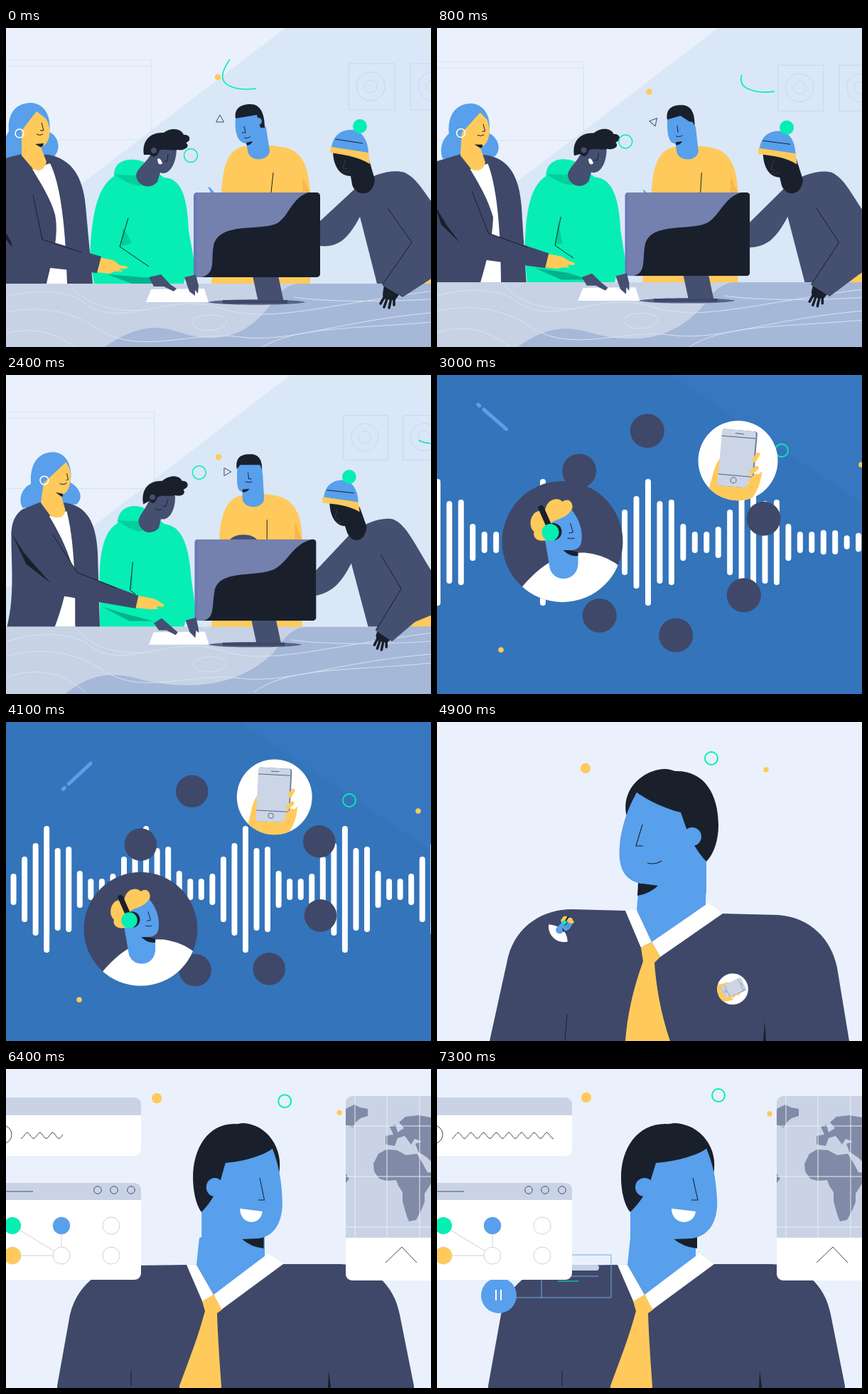
An HTML page with a canvas for the animation above (7.4 s loop, 598 px wide and 448 px high).

```html
<!DOCTYPE html>
<html lang="en">
<head>
<meta charset="utf-8">
<title>Team, sound and profile</title>
<style>
html, body { margin: 0; width: 100%; height: 100%; overflow: hidden; background: #eaf1fc; }
canvas { display: block; width: 598px; height: 448px; }
</style>
</head>
<body>
<canvas id="stage" width="598" height="448"></canvas>
<script>
const ctx = document.getElementById('stage').getContext('2d');
const LOOP = 7400, STEP = 100, TAU = Math.PI * 2;
const C = {
  navy: '#3f4868', slate: '#454f70', ink: '#19202c', blue: '#589fec', yellow: '#ffca5b',
  green: '#06eeb3', white: '#fff', pale: '#eaf1fc', sky: '#dae7f7', grey: '#c7d2e5', land: '#818aa6'
};

const clamp = (v, lo = 0, hi = 1) => Math.min(hi, Math.max(lo, v));
const mix = (a, b, p) => a + (b - a) * p;

// Eased value from time/value pairs.
function key(t, ...k) {
  if (t <= k[0]) return k[1];
  for (let i = 2; i < k.length; i += 2) {
    if (t < k[i]) {
      const u = (t - k[i - 2]) / (k[i] - k[i - 2]);
      return mix(k[i - 1], k[i + 1], u * u * (3 - 2 * u));
    }
  }
  return k[k.length - 1];
}

// Paths may have a second pose with the same commands; `pose` mixes them.
let pose = 0;
const NUMBER = /-?\d*\.?\d+/g;
function path(a, b) {
  if (!b) return new Path2D(a);
  const to = b.match(NUMBER);
  let i = 0;
  return new Path2D(a.replace(NUMBER, v => ' ' + mix(+v, +to[i++], pose).toFixed(2)));
}
function fill(color, a, b) {
  ctx.fillStyle = color;
  ctx.fill(path(a, b));
}
function line(color, width, a, b) {
  ctx.strokeStyle = color;
  ctx.lineWidth = width;
  ctx.stroke(path(a, b));
}
function roundLine(...args) {
  ctx.lineCap = 'round';
  line(...args);
  ctx.lineCap = 'butt';
}
function disc(color, x, y, r) {
  ctx.fillStyle = color;
  ctx.beginPath();
  ctx.arc(x, y, Math.max(0, r), 0, TAU);
  ctx.fill();
}
function ring(color, width, x, y, r) {
  ctx.strokeStyle = color;
  ctx.lineWidth = width;
  ctx.beginPath();
  ctx.arc(x, y, Math.max(0, r), 0, TAU);
  ctx.stroke();
}
const move = (a, b) => mix(a, b, pose);
function placed(x, y, scale, angle, draw) {
  ctx.save();
  ctx.translate(x, y);
  ctx.rotate(angle * Math.PI / 180);
  ctx.scale(scale, scale);
  draw();
  ctx.restore();
}
function zoom(s, draw) {
  placed(300, 222, s, 0, () => { ctx.translate(-300, -222); draw(); });
}
function background(color) {
  ctx.fillStyle = color;
  ctx.fillRect(0, 0, 598, 448);
}

/* Office */
function room() {
  fill(C.pale, 'M-30-30H432L0 300H-30Z');
  line('#d4e2f4', 1, 'M-30 45H205V157H-30M-30 54H205');
  for (const x of [482, 569]) {
    line('#c3d7f3', 1, `M${x} 50h65v65h-65z`);
    ring('#c3d7f3', 1, x + 31, 82, 20);
    ring('#c3d7f3', 1, x + 31, 82, 9);
  }
}

function sweaterMan() {
  fill(C.yellow,
    'M289 359L303 232C305 195 312 175 328 168C345 162 390 164 404 172C420 182 426 200 428 232V359Z',
    'M289 355L300 232C302 200 308 178 326 170C345 164 385 165 398 176C412 187 418 205 418 232L424 355Z');
  fill('#f5b84a', 'M418 210L417 232H428Z', 'M408 206L407 232H418Z');
  line(C.ink, 1, 'M376 203L373 231', 'M368 203L368 231');
  fill(C.blue,
    'M323 127C321 150 328 162 338 162L341 176C346 188 369 187 371 173L366 140L354 120Z',
    'M326 122C325 148 324 163 333 163L333 174C336 188 361 189 364 174L362 140L360 122Z');
  fill(C.ink,
    'M323 127C321 113 330 107 344 107C358 107 364 120 364 140L358 140L353 122Z',
    'M325 131C323 115 330 110 344 110C357 110 361 118 361 132L358 125L330 125Z');
  disc(C.blue, move(355, 359), move(131, 141), move(5, 3));
  fill(C.ink, 'M338 161L347 159Q345 164 339 165Z', 'M333 160L343 159Q340 164 333 164Z');
  line(C.ink, 1, 'M335 138L337 147L332 147M335 154Q341 156 344 152', 'M341 136L342 145L346 145M337 149Q343 151 347 149');
  fill(C.blue, 'M284 223L287 224L294 232H289Z', 'M296 232L297 232L298 233H296Z');
  fill(C.slate, 'M313 240C322 236 348 236 356 240Z', 'M313 234C320 221 349 221 356 234Z');
}

function beanieMan() {
  fill(C.slate,
    'M441 272L494 223C515 204 545 198 561 203C580 212 588 232 606 253V359H522L498 265C482 295 468 309 441 306Z',
    'M437 276L484 226C505 207 535 198 549 203C568 212 578 238 606 282V355H512L488 265C474 292 462 306 437 311Z');
  fill(C.yellow, 'M574 359L606 343V359Z', 'M562 355L606 337V355Z');
  fill(C.ink,
    'M460 172C460 194 470 208 485 208L487 220C492 237 517 238 519 213L510 182Z',
    'M457 176C457 198 466 212 479 212L482 221C488 237 508 237 510 213L500 185Z');
  line('#343b49', 1, 'M478 185L474 197L481 198M473 200Q480 205 485 200', 'M468 188L465 200L471 202M466 205Q472 209 477 206');
  fill(C.yellow, 'M457 165L510 174L512 191C494 180 475 178 456 175Z', 'M447 170L498 177L500 192C483 182 466 181 447 179Z');
  fill(C.blue, 'M458 167C461 148 475 142 488 143C501 145 509 157 510 175Z', 'M449 171C451 153 463 146 477 147C490 149 497 160 498 178Z');
  line(C.ink, 1, 'M463 156L502 162', 'M453 161L492 165');
  disc(C.green, move(498, 485), move(138, 142), 10);
}

function beanieArm() {
  fill(C.ink, 'M532 360L555 372L547 383L531 380L530 374Z', 'M526 358L547 370L539 378L525 375L523 368Z');
  roundLine(C.ink, 3.6,
    'M534 375L527 387M537 378L532 392M542 379L539 393M546 378L546 389',
    'M527 369L521 381M530 372L525 386M534 374L531 388M538 372L538 384');
  fill(C.slate, 'M571 300L606 285V347L558 378L529 361Z', 'M558 300L606 290V325L546 376L522 360Z');
  line(C.ink, 1, 'M537 253L571 301L530 360', 'M530 253L559 301L524 359');
}

function hoodieMan() {
  fill(C.green,
    'M124 359L118 325C120 270 126 225 152 208C151 184 176 181 194 188L222 210C245 211 255 232 257 285L268 345L252 350L250 359H225Z',
    'M130 355L130 322C128 270 130 222 155 208C156 184 178 180 192 186L222 209C246 211 257 238 260 285L268 342L252 346L250 355H222Z');
  fill('#03cf9b', 'M153 206C165 215 178 221 190 222L184 207Z', 'M156 204C166 213 178 219 190 220L185 205Z');
  fill('#03b28b', 'M143 346L204 351L222 359H177Z', 'M132 326L160 335L206 347H172Z');
  fill('#03cf9b', 'M165 280L160 307L177 302Z', 'M177 263L173 302L176 302Z');
  line(C.ink, 1, 'M172 267L160 307L201 335', 'M177 263L173 303L181 309');
  fill(C.slate,
    'M208 166C203 188 185 194 183 207C185 224 204 227 213 216L217 203C229 208 240 192 240 168Z',
    'M203 166C199 186 186 194 185 206C188 223 205 225 214 215L217 202C230 205 239 186 237 166Z');
  fill(C.ink,
    'M194 178C191 158 203 146 222 147C232 139 247 141 250 150C260 149 261 159 253 161C261 167 249 173 242 171C232 173 224 169 216 172C213 181 207 183 203 178Z',
    'M192 181C188 160 200 147 219 148C228 139 244 139 247 148C257 147 258 158 249 160C254 167 244 171 237 168C228 171 220 167 212 171C209 180 205 182 201 176Z');
  disc(C.slate, move(208, 205), move(172, 171), 4);
  line(C.ink, 1, 'M228 177L227 187L223 187', 'M227 174L224 184L220 184');
  if (pose < .5) fill(C.white, 'M213 184Q217 181 220 190Q214 195 213 184Z');
  else line(C.ink, 1, 'M209 187Q214 191 218 188');
}

function hoodieHands() {
  fill(C.slate,
    'M201 350L218 346L231 360L240 366L236 370L222 363L208 363Z',
    'M207 350L218 343L232 355L241 363L238 367L225 360L214 360Z');
  fill(C.slate,
    'M251 350L267 346L271 362L270 373L266 368L266 376L258 370Z',
    'M252 346L267 342L270 355L271 364L267 360L266 371L258 363Z');
}

function woman() {
  fill(C.blue,
    'M-2 182C-6 165-2 155 4 145C2 122 12 105 36 105C56 107 64 126 61 146C74 152 78 170 68 180Z',
    'M20 186C13 172 20 158 32 152C30 124 42 107 64 107C84 108 92 130 88 150C101 157 108 172 97 181Z');
  fill(C.navy,
    'M-30 190L22 177L60 178C92 184 108 208 112 250L122 359H-30C-30 310-30 270-30 225C-30 205-30 195-30 190Z',
    'M20 188L48 177L82 179C112 184 125 208 127 250L130 355H-2C9 310 4 270 4 225C4 206 10 195 20 188Z');
  fill(C.white,
    'M37 198L62 190C77 220 84 280 86 359H57C65 325 75 292 69 262C63 240 50 220 37 198Z',
    'M58 198L83 191C90 220 96 260 95 355H66C76 330 82 300 91 270C82 240 70 218 58 198Z');
  fill(C.yellow,
    'M43 117L56 127C67 145 60 165 49 167L57 188C54 199 47 203 38 198L22 179L22 144Z',
    'M82 121L87 130C91 147 87 166 75 168L81 189C80 200 70 202 60 198L46 179L50 151Z');
  fill(C.ink, 'M41 163L53 162Q52 168 48 167Z', 'M67 164L77 166Q79 171 75 170Z');
  line(C.ink, 1, 'M50 133L53 144L48 144M43 149Q48 152 52 149', 'M83 137L85 146L82 147M73 152Q79 154 83 151');
  ring(C.white, 1.6, move(19, 51), move(148, 147), 6);
  fill(C.yellow,
    'M131 322L151 326L160 333L171 335L170 338L160 338L164 342L152 342L146 345L128 343Z',
    'M184 311L207 315L214 319L222 324L220 327L211 326L213 330L203 330L198 330L180 328Z');
  fill(C.navy,
    'M-25 260L38 245L50 296L134 321L128 344L25 333L-25 315Z',
    'M4 222L62 225L98 278L185 311L181 329L76 311L35 307Z');
  fill(C.ink, 'M-10 270L7 300L9 308L-10 285Z', 'M5 223L22 250L60 293L25 266Z');
  line(C.ink, 1, 'M38 235L51 297L106 315', 'M63 224L98 278L153 300');
}

function desk() {
  fill('#c7d2e5', 'M-30 359H640V480H-30Z');
  fill('#a6b8d8', 'M110 470C170 420 205 414 243 427C315 451 350 418 375 385Q390 362 410 359H640V480Z',
    'M50 480C95 432 130 424 170 432C285 464 350 428 382 394Q402 362 424 359H640V480Z');
  for (const d of [
    'M-20 384C40 360 95 372 110 386C160 425 230 370 300 393S440 390 610 368',
    'M-20 404C50 383 100 402 132 424C190 460 260 425 330 434S470 410 610 399',
    'M90 359C105 385 150 402 200 395',
    'M350 455C400 418 480 424 610 412',
    'M-20 436C30 415 70 425 105 455',
    'M405 378C450 385 540 385 610 380',
    'M262 414C264 400 307 399 311 412C308 428 266 429 262 414Z'
  ]) line('#d9e3f2', 1, d);
}

function monitor() {
  fill('#56648d', 'M284 385C300 380 405 380 421 385C405 390 300 390 284 385Z');
  fill(C.slate, 'M347 348H383L391 385H355Z');
  fill(C.navy, 'M305 382H396V387H305Z');
  ctx.save();
  ctx.beginPath();
  ctx.roundRect(264, 231, 178, 119, 5);
  ctx.clip();
  fill('#7480ae', 'M264 231H442V350H264Z');
  fill('#6678b8', 'M264 231H268V350H264Z');
  fill(C.ink,
    'M425 231C402 239 398 264 382 274C358 286 300 271 292 306C288 326 296 345 275 350H442V231Z',
    'M436 231C408 238 402 262 382 274C356 288 298 273 293 308C289 328 294 348 275 350H442V231Z');
  ctx.restore();
}

// The stroke leaves to the right while its start is wiped away.
function arc() {
  ctx.save();
  ctx.translate(move(0, 270), move(0, 9));
  ctx.setLineDash([0, 44 * pose, 200]);
  line(C.green, 1.6, 'M315 44C301 64 301 76 316 82Q330 88 352 85');
  ctx.restore();
}

function office(t) {
  const drift = .0275 / 1700, cam = 1 - drift * t;
  const follow = cam / (1 - drift * Math.min(t, 1700));
  pose = key(t, 0, 0, 1700, 1);
  background(C.sky);
  zoom(cam, room);
  zoom(follow, () => {
    sweaterMan();
    beanieMan();
    hoodieMan();
    woman();
    disc(C.yellow, move(298, 299), move(69, 114), 4.3);
    ring(C.green, 1.5, move(260, 271.5), move(179, 136), 9.5);
    placed(move(301, 311), move(128, 135), 1, 90 * pose, () => line(C.navy, 1, 'M0-6L5.5 4L-5.5 4Z'));
    arc();
  });
  zoom(cam, () => {
    desk();
    monitor();
    fill(C.white, 'M204 367L279 366L285 385H197Z');
  });
  zoom(follow, () => { hoodieHands(); beanieArm(); });
}

/* Sound */
const PROFILE = [89, 58, 60, 26, 15, 15, 22, 46, 65];

function listener() {
  ctx.save();
  disc(C.navy, 0, 0, 85);
  ctx.clip();
  fill(C.white, 'M-62 70C-28 26 10 10 42 17Q66 22 82 36L50 90H-50Z');
  fill(C.blue, 'M-24-40L12-46C22-34 29-18 27-2C26 8 20 13 8 12L22 16V32C20 58-14 58-18 36L-25-5Z');
  fill(C.ink, 'M1 12H12L22 15V20Q11 22 1 12Z');
  fill(C.yellow, 'M-22-2C-36 1-42-6-40-14C-47-20-46-32-41-38C-36-46-24-42-24-46C-20-62-4-62 0-56C8-62 15-56 14-47C8-34-6-32-14-28L-18-16Z');
  roundLine(C.ink, 8, 'M-30-47L-19-22');
  disc(C.ink, -13, -14, 12);
  disc(C.green, -17, -13, 12);
  line(C.ink, 1, 'M11-26L15-13L9-12M7-5Q13-3 17-5');
  ctx.restore();
}

function phone(tilt) {
  ctx.save();
  disc(C.white, 0, 0, 56);
  ctx.clip();
  placed(0, 0, 1, tilt, () => {
    fill(C.yellow, 'M-25-2C-34 10-33 30-42 62H14C26 52 34 38 35 12L16 30H-26Z');
    fill('#6f7c9c', 'M-24-43H20Q24-43 24-39V32Q24 37 20 37H-24Z');
    fill('#cbd5e6', 'M-22-43H18Q22-43 22-39V32Q22 37 18 37H-22Q-26 37-26 33V-39Q-26-43-22-43Z');
    line('#56627f', 1, 'M-26-33H22M-26 21H22M-7-38H5');
    ring('#56627f', 1, -4, 28, 4);
    roundLine(C.yellow, 6, 'M23-3L27-11M20 15L27 8M20 27L27 19M17 36L25 30');
  });
  ctx.restore();
}

function orbit(degrees, radius) {
  const a = degrees * Math.PI / 180;
  return [316 + radius * Math.cos(a), 222 + radius * Math.sin(a)];
}
const listenerSpot = k => [...orbit(175.1 - 23.6 * k, 140 + 4 * k), 1 - .06 * k];
const phoneSpot = k => [...orbit(-43.4 - 18.7 * k, 148 - 16 * k), 1 - .055 * k];

function sound(t) {
  const k = (t - 3000) / 1100, pop = key(t, 2400, 0, 2800, 1);
  background('#3474bb');
  fill('#3777c0', 'M330 0H598V180Z');

  const front = 575 + (t - 3000) * 1.15;
  for (let i = -36; i <= 36; i++) {
    const x = 297 + 40 * k + i * 16.45 * (1 - .055 * k);
    const half = PROFILE[(i + 36) % 9] * clamp((front - x) / 40, .15, 1) - 4;
    roundLine(C.white, 8, `M${x} ${235 - half}V${235 + half}`);
  }
  placed(78 + 22 * k, 59 + 17 * k, 1, 41 - 84 * k, () => roundLine('#589fec', 5, 'M-27 0H-24M-16 0H26'));

  for (const angle of [-8, 37, 82, 127, 217, 262]) {
    disc(C.navy, ...orbit(angle - 15.5 * k, 145 - 9 * k), (24 - 1.2 * k) * pop);
  }
  ring(C.green, 1.8, 485 - 2 * k, 106 + 4 * k, 9);
  const [lx, ly, ls] = listenerSpot(k), [px, py, ps] = phoneSpot(k);
  placed(lx, ly, ls * pop, 0, listener);
  placed(px, py, ps * pop, 0, () => phone(5 - 2 * k));
  disc(C.yellow, 597 - 17 * k, 126 - k, 3.8);
  disc(C.yellow, 90 + 13 * k, 386 + 4 * k, 3.8);
}

/* Profile */
function torso() {
  fill(C.navy,
    'M74 448L100 330C112 285 150 263 190 263L265 265L400 269L480 271C525 274 555 305 563 345L580 448V520H74Z',
    'M72 448L90 348C102 300 140 279 180 279L254 278L388 277L470 277C515 278 546 305 554 348L574 448V520H72Z');
  fill(C.blue, 'M284 228L281 264L302 309L378 257L379 200Z', 'M272 240L268 278L292 320L364 268L364 215Z');
  fill(C.white, 'M265 265L281 264L302 309L287 317Z', 'M254 278L268 278L292 320L277 331Z');
  fill(C.white, 'M302 309L382 254L402 269L314 330Z', 'M292 320L369 262L390 277L303 341Z');
  fill(C.yellow,
    'M287 317L302 309L314 330L306 338C308 370 315 410 328 448V520H265V448C268 410 276 375 290 336Z',
    'M276 329L292 320L304 341L297 346C298 380 301 420 303 448V520H244V448C258 410 270 380 280 343Z');
  line(C.ink, 1, 'M183 410L180 448', 'M176 427L176 448');
  fill(C.ink, 'M461 420L459 448V520H463V448Z', 'M454 427L453 448V520H457V448Z');
}

function head(t) {
  fill(C.ink, 'M283 226L312 229Q300 241 282 244Z', 'M270 238L304 241Q290 253 270 255Z');
  fill(C.ink,
    'M267 132C258 95 290 66 322 66C328 66 333 69 336 69C375 68 396 100 396 145C396 165 390 185 379 196L335 170L281 99Z',
    'M247 151C239 115 265 80 302 79C306 79 310 81 314 80C355 80 377 115 377 155C377 175 372 195 364 204L320 175L257 115Z');
  fill(C.blue,
    'M281 99C300 112 322 122 343 127L351 150C358 168 366 182 379 196L379 240L312 230L290 227C265 225 254 205 257 175C258 155 266 125 281 99Z',
    'M257 115C275 127 305 133 328 135L335 158C342 178 350 190 364 204L364 254L303 242L278 241C252 238 240 215 242 185C243 155 250 130 257 115Z');
  disc(C.blue, move(359, 344), move(161, 169), 13);
  line(C.ink, 1.1, 'M289 144L280 174L290 174', 'M276 156L269 187L278 187');
  if (t < 5200) line(C.ink, 1.1, 'M296 198Q307 201 316 195', 'M280 211Q291 214 300 208');
  else fill(C.white, 'M272 203L306 199C306 212 296 218 289 218C280 218 273 212 272 203Z');
}

function card(x, y, scale, angle, left, w, h, top, content) {
  placed(x, y, scale, angle, () => {
    ctx.beginPath();
    ctx.roundRect(left, 0, w, h, 9);
    ctx.clip();
    fill(C.white, `M${left} 0h${w}v${h}h${-w}z`);
    fill('#c9d3e5', `M${left} 0h${w}v${top}h${-w}z`);
    content();
  });
}

function audioCard(t) {
  const end = key(t, 6000, -169, 6900, -26);
  ring(C.navy, 1, -195, 52, 13);
  ctx.beginPath();
  for (let x = -169; x <= end; x++) ctx.lineTo(x, 53.5 + 4 * Math.cos((x + 169) * TAU / 17.8));
  ctx.strokeStyle = C.navy;
  ctx.lineWidth = 1;
  ctx.stroke();
}

function networkCard(t, settle) {
  const node = (x0, y0, r0, x1, y1) => [mix(x0, x1, settle), mix(y0, y1, settle), mix(r0, 12, settle)];
  const greenNode = node(-159, 86, 8, -181, 60), blueNode = node(-115, 78, 10, -112, 60);
  const yellowNode = node(-89, 97, 4.5, -181, 102), hub = node(-115, 113, 9, -112, 102);
  const joins = settle > .5 ? [greenNode, blueNode, yellowNode] : [greenNode, yellowNode];
  for (const [x, y] of joins) line('#cdd1dc', 1, `M${x} ${y}L${hub[0]} ${hub[1]}`);
  for (const n of [blueNode, hub]) { disc(C.white, ...n); ring('#cdd1dc', 1, ...n); }
  ring('#cdd1dc', 1, ...node(-159, 113, 8, -181, 102));
  disc(C.green, ...greenNode);
  disc(C.yellow, ...yellowNode);
  disc(C.blue, blueNode[0], blueNode[1], key(t, 5900, 0, 6300, 12));
  ctx.globalAlpha = settle;
  for (const y of [60, 102]) ring('#cdd1dc', 1, -42, y, 12);
  line(C.slate, 1, 'M-195 12H-152');
  for (const x of [-61, -38, -14]) ring(C.slate, 1, x, 10, 5.3);
  ctx.globalAlpha = 1;
}

function mapCard(settle) {
  ctx.globalAlpha = settle;
  placed(-478, -38, 1, 0, () => {
    fill(C.land, 'M478 56L490 50L498 54L509 56V66L499 69L493 74L488 82L478 79ZM478 147L483 154L478 160Z');
    fill(C.land, 'M535 113L524 119L517 133L518 144L525 154L535 157L549 156L552 164L558 173L558 186L564 207L567 214L577 212L584 199L589 187V175L600 158L606 146L593 145L586 132L578 119L563 121L550 114Z');
    fill(C.land, 'M534 106V94L545 92L540 81L548 78L551 89L560 83L553 75L562 67L580 65L598 68L660 60V142L608 139L592 124L580 116L576 105L585 102L575 98L570 106L561 94L551 97L547 108Z');
    line('#e9eef7', 1, 'M491 38V237M536 38V237M582 38V237M478 80H660M478 151H660M478 222H660');
    line(C.navy, 1, 'M534 272L557 250L578 272');
  });
  ctx.globalAlpha = 1;
}

function player(t) {
  const grow = key(t, 6400, 0, 6900, 1);
  if (!grow) return;
  ctx.globalAlpha = grow;
  line('#78a9e2', 1, 'M110 321H245V261H147V321');
  roundLine(C.grey, 8, 'M180 279H224');
  line('#78a9e2', 1, 'M180 291H227');
  line(C.green, 1, 'M170 298H199');
  ctx.globalAlpha = 1;
  placed(87, 318, grow, 0, () => {
    disc(C.blue, 0, 0, 25);
    line(C.white, 2, 'M-4-8V7M3-8V7');
  });
}

function profile(t) {
  const settle = key(t, 5600, 0, 6300, 1), away = key(t, 5200, 1, 5600, 0);
  pose = key(t, 4900, 0, 5300, 1);
  background(C.pale);

  placed(0, key(t, 4500, 70, 4900, 0) + key(t, 5600, 0, 6300, -3), 1, 0, () => {
    torso();
    const turn = key(t, 6200, 1, 6600, -1);
    ctx.save();
    ctx.translate(318, 0);
    ctx.scale(Math.max(.93, Math.abs(turn)) * (turn > 0 ? 1 : -1), 1);
    ctx.translate(-318, 0);
    head(t);
    ctx.restore();
  });

  const fly = key(t, 4500, 0, 4900, 1), size = key(t, 4900, 1, 5200, 0);
  const [lx, ly, ls] = listenerSpot(1.36), [px, py, ps] = phoneSpot(1.36);
  if (size) {
    placed(mix(lx, 179, fly), mix(ly, 287, fly), mix(ls, .26, fly) * size, 55 * fly, listener);
    placed(mix(px, 416, fly), mix(py, 375, fly), mix(ps, .39, fly) * size, 62 * fly, () => phone(2));
  }

  const then = (a, b, c) => key(t, 4900, a, 5600, b, 7300, c);
  disc(C.yellow, then(209, 214, 210), then(65, 42, 40), 7.2);
  ring(C.green, 2, then(386, 389, 396), then(51, 52, 37), 9);
  disc(C.yellow, then(463, 470, 468), then(67, 60, 63), 3.7);

  player(t);
  const at = (a, b) => mix(a, b, settle);
  card(at(178, 190) - 240 * away, at(73, 40), at(.93, 1), at(-2, 0), -260, 260, 82, at(29, 25), () => audioCard(t));
  card(at(186, 190) - 240 * away, at(152, 160), at(.89, 1), at(5, 0), -260, 260, 136, at(29, 24), () => networkCard(t, settle));
  card(at(469, 478) + 180 * away, at(106, 38), at(.765, 1), at(-4, 0), 0, 165, 259, at(203, 199), () => mapCard(settle));
}

function frame(now) {
  const t = Math.floor(now % LOOP / STEP) * STEP;
  ctx.lineJoin = 'round';
  if (t < 2500) office(t);
  else if (t < 4500) sound(t);
  else profile(t);
  requestAnimationFrame(frame);
}
frame(0);
</script>
</body>
</html>
```
